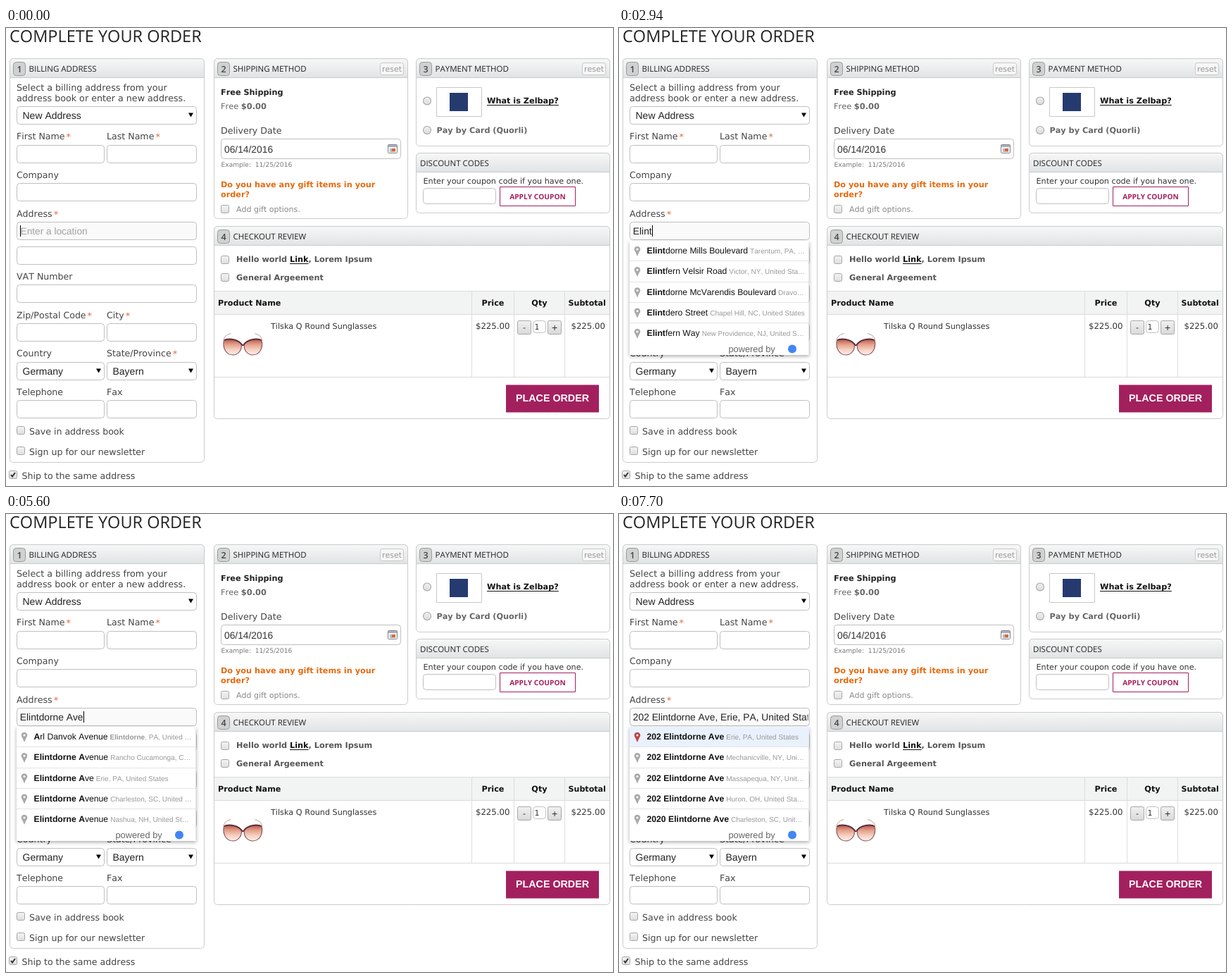
An HTML page with a canvas for the animation above (8000 ms loop, 862 px wide and 650 px high).

```html
<!DOCTYPE html>
<html lang="en">
<head>
<meta charset="utf-8">
<title>Checkout form</title>
<style>
  html, body { margin: 0; width: 100%; height: 100%; overflow: hidden; background: #fff; }
  canvas { display: block; }
</style>
</head>
<body>
<canvas id="stage" width="862" height="650"></canvas>
<script>
const ctx = document.getElementById('stage').getContext('2d');
const LOOP = 8000;

const VERA = '"DejaVu Sans", sans-serif';
const OPEN = '"Open Sans", sans-serif';
const ARIAL = '"Liberation Sans", Arial, sans-serif';
const LABEL = '12.6px ' + VERA;
const SMALL = '11.2px ' + VERA;
const BOLD = 'bold 11.28px ' + VERA;
const FIELD = '13.8px ' + ARIAL;
const PLUM = '#a3205f';

// ---------- content of the address search ----------

const QUERY = 'Elintdorne Ave 202';
const RESULT = '202 Elintdorne Ave, Erie, PA, United States';
const SELECT_AT = 7700;

// [time, characters typed]
const typed = [
  [1190, 1], [1540, 2], [1820, 3], [2240, 4], [2800, 5], [3010, 6],
  [3430, 7], [3710, 8], [4060, 9], [4340, 10], [4830, 11], [5250, 12],
  [5460, 13], [5600, 14], [6230, 15], [6370, 16], [6650, 17], [6930, 18]
];

const first = ['Elno Street|Seattle, WA', 'Elzo Street|Seattle, WA',
  'Elxa Boulevard|Santa Monica, CA', 'Elno Street|New York, NY', 'Elar 47|Seattle, WA'];
const near = ['Elindar Street|Houston, TX', 'Elinvo Road|Akron, OH',
  'Elintfern Way|New Providence, NJ', 'Elinbek Avenue|Brooklyn, NY', 'Elinsol Lane|Reno, NV'];
const towns = ['Elintdorne Mills Boulevard|Tarentum, PA', 'Elintfern Velsir Road|Victor, NY',
  'Elintdorne McVarendis Boulevard|Dravosburg, PA', 'Elintdero Street|Chapel Hill, NC',
  'Elintfern Way|New Providence, NJ'];
const roads = [towns[0], towns[2], 'Elintdorn Landing Road|Shiloh, TN',
  'Elintdorne Road|Butler, PA', 'Elintdorne Mills Cir|Tarentum, PA'];
const avenues = ['Arl Danvok Avenue|Elintdorne, PA', 'Elintdorne Avenue|Rancho Cucamonga, CA',
  'Elintdorne Ave|Erie, PA', 'Elintdorne Avenue|Charleston, SC', 'Elintdorne Avenue|Nashua, NH'];
const aves = ['Erie, PA', 'Nashua, NH', 'Mechanicville, NY', 'Massapequa Park, NY', 'Massapequa, NY']
  .map(place => 'Elintdorne Ave|' + place);
const numbered = (...nums) =>
  ['Erie, PA', 'Mechanicville, NY', 'Massapequa, NY', 'Huron, OH', 'Charleston, SC']
    .map((place, i) => `${nums[i] || nums[0]} Elintdorne Ave|${place}`);

// [time, matched characters, suggestions]
const lists = [
  [1400, 1, first], [2030, 3, near], [2520, 4, near], [2940, 5, towns],
  [3220, 6, roads], [3990, 8, roads], [4340, 9, roads], [4620, 10, roads],
  [5390, 12, avenues], [5740, 13, avenues], [5950, 14, avenues], [6230, 14, aves],
  [6510, 16, numbered(2)], [6790, 17, numbered(20)],
  [7210, 18, numbered(202, 202, 202, 202, 2020)]
];

const latest = (steps, t) => steps.filter(s => s[0] <= t).pop();

// ---------- drawing helpers ----------

function text(str, x, y, font = LABEL, color = '#444', align = 'left') {
  ctx.font = font;
  ctx.fillStyle = color;
  ctx.textAlign = align;
  ctx.fillText(str, x, y);
  return ctx.measureText(str).width;
}

function rect(x, y, w, h, color) {
  ctx.fillStyle = color;
  ctx.fillRect(x, y, w, h);
}

function box(x, y, w, h, r, fill, stroke) {
  ctx.beginPath();
  ctx.roundRect(x + .5, y + .5, w - 1, h - 1, r);
  ctx.fillStyle = fill;
  ctx.fill();
  ctx.strokeStyle = stroke;
  ctx.lineWidth = 1;
  ctx.stroke();
}

function shade(y, h, ...colors) {
  const g = ctx.createLinearGradient(0, y, 0, y + h);
  colors.forEach((c, i) => g.addColorStop(i / (colors.length - 1), c));
  return g;
}

function circle(x, y, r, fill) {
  ctx.beginPath();
  ctx.arc(x, y, r, 0, Math.PI * 2);
  ctx.fillStyle = fill;
  ctx.fill();
}

function panel(x, y, w, h, title, badge) {
  box(x, y, w, h, 5, '#fff', '#c9cccc');
  box(x, y, w, 28, [5, 5, 0, 0], shade(y, 28, '#f7f8f8', '#e0e3e4'), '#c9cccc');
  if (badge) {
    box(x + 5, y + 5, 18, 20, 4, '#d0d1d1', '#9a9c9c');
    text(badge, x + 14, y + 19.5, '600 12.5px ' + OPEN, '#444', 'center');
  }
  text(title, x + (badge ? 27.5 : 6), y + 19, '500 11.5px ' + OPEN, '#222');
}

function label(str, x, y, required) {
  const w = text(str, x, y);
  if (required) text('*', x + w + 2, y + 1, '13px ' + VERA, '#e2683a');
}

const input = (x, y, w, h = 26, fill = '#fff') => box(x, y, w, h, 4, fill, '#bfbfbf');

function select(x, y, w, value) {
  input(x, y, w);
  text(value, x + 8.5, y + 17.5, '14px ' + ARIAL, '#222');
  const right = x + w - 5;
  ctx.fillStyle = '#000';
  ctx.beginPath();
  ctx.moveTo(right - 7, y + 9.5);
  ctx.lineTo(right, y + 9.5);
  ctx.lineTo(right - 3.5, y + 15.5);
  ctx.fill();
}

function checkbox(x, y, checked) {
  box(x, y, 12, 12, 2, shade(y, 12, '#f4f4f4', '#dedede'), '#a5a5a5');
  if (!checked) return;
  ctx.beginPath();
  ctx.moveTo(x + 3, y + 6);
  ctx.lineTo(x + 5, y + 8.5);
  ctx.lineTo(x + 9, y + 3);
  ctx.strokeStyle = '#333';
  ctx.lineWidth = 2;
  ctx.stroke();
}

function radio(x, y) {
  circle(x, y, 6, '#a0a0a0');
  circle(x, y, 5, shade(y - 5, 10, '#efefef', '#dcdcdc'));
}

function resetButton(x) {
  box(x, 49, 34, 18, 3, '#f6f6f6', '#c8c8c8');
  text('reset', x + 17, 62, '11px ' + VERA, '#999', 'center');
}

function link(str, x, y) {
  const w = text(str, x, y, BOLD, '#111');
  rect(x, y + 2, w, 1, '#111');
  return w;
}

// ---------- the form ----------

function billing() {
  panel(5, 43, 277, 574, 'BILLING ADDRESS', '1');
  text('Select a billing address from your', 15, 88.5, '12.7px ' + VERA);
  text('address book or enter a new address.', 15, 103.5, '12.7px ' + VERA);
  select(15, 111, 256, 'New Address');

  label('First Name', 15, 158, true);
  label('Last Name', 143, 158, true);
  label('Company', 15, 213);
  label('Address', 15, 267.5, true);
  label('VAT Number', 15, 357);
  label('Zip/Postal Code', 15, 411.5, true);
  label('City', 143, 411.5, true);
  label('Country', 15, 466);
  label('State/Province', 143, 466, true);
  label('Telephone', 15, 521);
  label('Fax', 143, 521);

  for (const y of [166, 419, 528]) {
    input(15, y, 125);
    input(143, y, 128);
  }
  for (const y of [220, 310, 364]) input(15, y, 256);
  select(15, 474, 125, 'Germany');
  select(143, 474, 128, 'Bayern');

  checkbox(15, 565);
  text('Save in address book', 33, 577);
  checkbox(15, 594);
  text('Sign up for our newsletter', 33, 606);
  checkbox(4, 628, true);
  text('Ship to the same address', 22.5, 640);
}

function shipping() {
  panel(295, 43, 276, 228, 'SHIPPING METHOD', '2');
  resetButton(531);
  text('Free Shipping', 305, 95, BOLD, '#222');
  const w = text('Free ', 305, 115, '11.4px ' + VERA, '#666');
  text('$0.00', 305 + w, 115, 'bold 11.4px ' + VERA, '#666');
  label('Delivery Date', 305, 150);
  input(305, 157, 256, 29);
  text('06/14/2016', 310, 177, FIELD, '#333');
  box(542, 165, 14, 13, 1, '#f3f3f3', '#858585');
  rect(543, 166, 12, 3, '#a9afbc');
  rect(545, 171, 8, 5, '#b5bac6');
  rect(548, 171, 5, 4, '#d9692f');
  text('Example:  11/25/2016', 305.5, 197, '9.1px ' + VERA, '#777');
  text('Do you have any gift items in your', 305, 226, BOLD, '#e5690d');
  text('order?', 305, 240, BOLD, '#e5690d');
  checkbox(305, 251);
  text('Add gift options.', 327, 261, '11px ' + VERA, '#888');
}

function payment() {
  panel(582, 43, 276, 125, 'PAYMENT METHOD', '3');
  resetButton(818);
  radio(598, 103.5);
  box(611, 84, 65, 42, 0, '#fff', '#c8c8c8');
  rect(630, 92, 26, 26, '#253b70');
  link('What is Zelbap?', 683, 107);
  radio(598, 145);
  text('Pay by Card (Quorli)', 611.5, 149, BOLD, '#666');

  panel(582, 177, 276, 86, 'DISCOUNT CODES');
  text('Enter your coupon code if you have one.', 592.5, 221, '11.2px ' + VERA, '#333');
  input(592, 227, 104, 23);
  box(701, 225, 108, 28, 0, '#fff', PLUM);
  text('APPLY COUPON', 755, 243, 'bold 10.2px ' + OPEN, PLUM, 'center');
}

function lens() {
  ctx.beginPath();
  ctx.moveTo(-27, -6);
  ctx.bezierCurveTo(-20, -10, -6, -7, -2, 0);
  ctx.bezierCurveTo(-1, 8, -7, 14.5, -14, 14.5);
  ctx.bezierCurveTo(-23, 14.5, -29, 6, -27, -6);
  ctx.fillStyle = shade(-8, 23, '#b5564a', '#e5a08a', '#f6d3c4', '#fdf1ea');
  ctx.fill();
  ctx.strokeStyle = '#80505a';
  ctx.lineWidth = 1.1;
  ctx.stroke();

  ctx.beginPath();
  ctx.moveTo(-27.5, -6);
  ctx.bezierCurveTo(-20, -10, -6, -8, 0, 1.5);
  ctx.strokeStyle = '#5a2f3b';
  ctx.lineWidth = 1.8;
  ctx.stroke();

  ctx.beginPath();
  ctx.moveTo(-27, -5);
  ctx.quadraticCurveTo(-28, -13, -17, -16);
  ctx.strokeStyle = '#b9a09a';
  ctx.lineWidth = 1;
  ctx.stroke();
}

function sunglasses() {
  for (const side of [1, -1]) {
    ctx.save();
    ctx.translate(336.3, 449.5);
    ctx.scale(side, 1);
    lens();
    ctx.restore();
  }
}

function stepButton(sign, x) {
  box(x, 415, 20, 20, 2, shade(415, 20, '#f1f1f1', '#d9d9d9'), '#a8a8a8');
  text(sign, x + 10, 429, '11px ' + VERA, '#222', 'center');
}

function review() {
  panel(295, 281, 563, 274, 'CHECKOUT REVIEW', '4');
  checkbox(305, 323);
  let x = 327;
  x += text('Hello world ', x, 332, BOLD, '#555');
  x += link('Link', x, 332);
  text(', Lorem Ipsum', x, 332, BOLD, '#555');
  checkbox(305, 348);
  text('General Argeement', 327, 358, BOLD, '#555');

  rect(296, 373, 561, 34, '#f2f3f3');
  for (const y of [373, 406, 495]) rect(296, y, 561, 1, '#d9dbdb');
  for (const cx of [661, 721, 793]) rect(cx, 374, 1, 121, '#dcdede');
  text('Product Name', 301, 394, 'bold 11.2px ' + VERA, '#111');
  text('Price', 691.5, 394, BOLD, '#111', 'center');
  text('Qty', 757.5, 394, BOLD, '#111', 'center');
  text('Subtotal', 798.5, 394, 'bold 11.1px ' + VERA, '#111');

  sunglasses();
  text('Tilska Q Round Sunglasses', 376, 427, SMALL, '#333');
  text('$225.00', 667, 427, '11.7px ' + VERA, '#333');
  text('$225.00', 802.5, 427, '11.7px ' + VERA, '#333');
  stepButton('-', 726);
  input(748, 415, 19, 18);
  text('1', 754, 428, '11px ' + VERA, '#333', 'center');
  stepButton('+', 769);

  rect(710, 506.5, 132, 39, PLUM);
  text('PLACE ORDER', 776, 530.3, 'bold 14.3px ' + ARIAL, '#fff', 'center');
}

// ---------- address field and suggestions ----------

function addressField(t) {
  input(15, 275, 256, 26, '#fafafa');
  const chosen = t >= SELECT_AT;
  const step = latest(typed, t);
  const value = chosen ? RESULT : step ? QUERY.slice(0, step[1]) : '';

  ctx.save();
  ctx.beginPath();
  ctx.rect(16, 276, 252.5, 24);
  ctx.clip();
  if (!value) text('Enter a location', 20.5, 293, '13.7px ' + ARIAL, '#a0a0a0');
  const w = text(value, 19.8, 293, FIELD, '#222');
  ctx.restore();

  const blinkOn = step || Math.floor(t / 280 - .25) % 2 !== 0;
  if (!chosen && blinkOn) rect(Math.round(20 + w), 280, 1, 16, '#000');
}

// Splits a string into [text, bold] runs; each query word is used up once,
// and house numbers are matched whole.
function mark(str, words) {
  const runs = [];
  for (const part of str.split(/(?<= )/)) {
    const i = words.findIndex(q => part.startsWith(q));
    if (i < 0) {
      runs.push([part, false]);
    } else {
      const [q] = words.splice(i, 1);
      const hit = part.match(/^\d+/)?.[0] ?? q;
      runs.push([hit, true], [part.slice(hit.length), false]);
    }
  }
  return runs;
}

function drawRuns(runs, x, y, size, color) {
  for (const [str, bold] of runs)
    x += text(str, x, y, `${bold ? 'bold ' : ''}${size}px ${ARIAL}`, color);
  return x;
}

function runsWidth(runs, size) {
  return runs.reduce((sum, [str, bold]) => {
    ctx.font = `${bold ? 'bold ' : ''}${size}px ${ARIAL}`;
    return sum + ctx.measureText(str).width;
  }, 0);
}

function fitRuns(str, words, size, room) {
  let runs = mark(str, [...words]);
  for (let n = str.length; runsWidth(runs, size) > room && n > 0; n--)
    runs = mark(str.slice(0, n) + '…', [...words]);
  return runs;
}

function pin(x, y, color) {
  ctx.beginPath();
  ctx.arc(x, y, 4.3, Math.PI * .9, Math.PI * .1);
  ctx.quadraticCurveTo(x + 2, y + 5, x, y + 10);
  ctx.quadraticCurveTo(x - 2, y + 5, x - 4.1, y + 1.3);
  ctx.fillStyle = color;
  ctx.fill();
  circle(x, y, 1.5, '#fff');
}

function dropdown(t) {
  const step = latest(lists, t);
  if (!step) return;
  const [, count, rows] = step;

  ctx.save();
  ctx.shadowColor = 'rgba(0,0,0,.32)';
  ctx.shadowBlur = 5;
  ctx.shadowOffsetY = 2;
  rect(15, 302, 254.5, 162, '#fff');
  ctx.restore();

  rows.forEach((row, i) => {
    const top = 302 + i * 29.25;
    const active = i === 0 && t >= SELECT_AT;
    if (active) rect(15, top, 254.5, 29, '#e9f1fd');
    if (i) rect(15, Math.round(top) - 1, 254.5, 1, '#e4e4e4');
    pin(26, top + 12, active ? '#c04444' : '#a9a9a9');

    const words = QUERY.slice(0, count).split(' ');
    const [name, place] = row.split('|');
    const y = top + 18.2;
    const x = drawRuns(mark(name, words), 39.5, y, 12.2, '#111') + 3;
    drawRuns(fitRuns(place + ', United States', words, 10.05, 265 - x), x, y, 10.05, '#999');
  });

  text('powered by', 155.5, 459.5, '12.8px ' + ARIAL, '#666');
  circle(246, 455.5, 6, '#4285f4');
}

function draw(t) {
  rect(0, 0, 862, 650, '#fff');
  ctx.fontKerning = 'none';
  ctx.textRendering = 'geometricPrecision';
  text('COMPLETE YOUR ORDER', 5, 20, '23.5px ' + OPEN, '#222');
  billing();
  shipping();
  payment();
  review();
  addressField(t);
  dropdown(t);
}

const start = performance.now();
function tick() {
  draw((performance.now() - start) % LOOP);
  requestAnimationFrame(tick);
}
tick();
</script>
</body>
</html>
```
